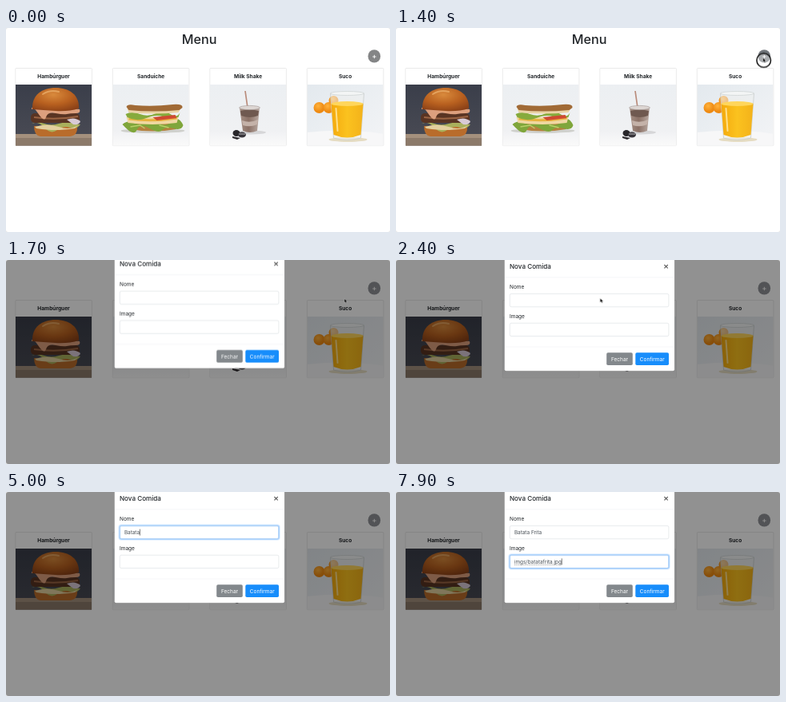
An HTML page that plays this animation: 480x256 px, repeating every 8 s.

```html
<!DOCTYPE html>
<html lang="pt">
<head>
<meta charset="utf-8">
<title>Menu</title>
<style>
  html, body { margin: 0; width: 100%; height: 100%; overflow: hidden; background: #e6e6e6; }
  svg { display: block; width: 100vw; height: 100vh; }
  text { font-family: Inter, Roboto, sans-serif; font-size: 6.5px; fill: #212529; white-space: pre; }
  .title { font-size: 16.2px; font-weight: 500; }
  .name { font-size: 6.6px; font-weight: 700; }
  .mid { text-anchor: middle; }
  .head { font-size: 8.1px; font-weight: 500; }
  .white { fill: #fff; }
  .value { font-size: 6.4px; fill: #495057; }
  .box { fill: #fff; stroke: #d9dde1; stroke-width: .6; }
  .focus { fill: none; stroke: #80bdff; stroke-width: .8; }
  .glow { fill: none; stroke: #007bff; stroke-opacity: .25; stroke-width: 1.4; }
</style>
</head>
<body>
<svg viewBox="0 0 480 256" preserveAspectRatio="none">
  <defs>
    <clipPath id="photo"><rect width="95" height="76.5"/></clipPath>
    <linearGradient id="night" x2="0" y2="1"><stop stop-color="#3a3e4a"/><stop offset="1" stop-color="#4b4c55"/></linearGradient>
    <linearGradient id="pale" x2="0" y2="1"><stop stop-color="#eceff2"/><stop offset=".75" stop-color="#f0f1f3"/><stop offset="1" stop-color="#fafafa"/></linearGradient>
    <linearGradient id="cool" x2="1" y2="1"><stop stop-color="#e3e9ee"/><stop offset="1" stop-color="#f3f4f6"/></linearGradient>
    <radialGradient id="bun" cx=".45" cy=".3" r=".75"><stop stop-color="#d98a3c"/><stop offset=".55" stop-color="#b8601f"/><stop offset="1" stop-color="#8b4117"/></radialGradient>
    <linearGradient id="shake" x2="1"><stop stop-color="#a58f85"/><stop offset=".45" stop-color="#8b7166"/><stop offset="1" stop-color="#b9aaa3"/></linearGradient>
    <linearGradient id="juice" x2="1"><stop stop-color="#f4a90d"/><stop offset=".5" stop-color="#fbc21f"/><stop offset="1" stop-color="#f3b21a"/></linearGradient>
    <radialGradient id="orange" cx=".4" cy=".35"><stop stop-color="#ffb33d"/><stop offset="1" stop-color="#ee8a12"/></radialGradient>

    <g id="burger">
      <rect width="95" height="77" fill="url(#night)"/>
      <rect y="62" width="95" height="15" fill="#a4907d"/>
      <rect y="67" width="95" height="10" fill="#8c7a6a"/>
      <path d="M23 52H77Q78 64 68 65H31Q23 64 23 52Z" fill="#b96c2b"/>
      <path d="M20 49Q28 46 36 49T54 49T70 48T81 50Q76 57 68 54T52 57T36 54T20 49Z" fill="#a9b05c"/>
      <path d="M24 53Q40 48 54 53T78 51L74 55Q60 57 50 57T26 55Z" fill="#e2cf9f"/>
      <rect x="19" y="36" width="61" height="12" rx="5" fill="#593423"/>
      <path d="M23 41Q50 45 78 40" fill="none" stroke="#9b6443" stroke-width="2"/>
      <path d="M64 44Q74 40 81 46Q80 51 72 50Z" fill="#d8cbd6"/>
      <path d="M20 31Q50 26 80 31Q82 36 75 36T64 37T50 36T38 41T28 36T20 31Z" fill="#dda07e"/>
      <path d="M21 31C20 13 33 4 50 4S80 13 79 30Q66 34 50 33T21 31Z" fill="url(#bun)"/>
      <path d="M34 12Q43 6 54 9" fill="none" stroke="#eeb46f" stroke-width="2" stroke-linecap="round" opacity=".7"/>
    </g>

    <g id="sandwich">
      <rect width="95" height="77" fill="url(#pale)"/>
      <ellipse cx="50" cy="58" rx="40" ry="3" fill="#cfd0cc"/>
      <path d="M18 49H82L79 56Q50 61 22 56Z" fill="#b5813f"/>
      <path d="M12 50Q18 44 26 48T42 47T58 48T74 46T88 51Q86 58 76 55T62 57T46 55T30 57T12 50Z" fill="#7fa63b"/>
      <path d="M17 41H82L80 48Q50 52 19 48Z" fill="#f0d8a2"/>
      <path d="M20 43Q50 47 80 42" fill="none" stroke="#e8b340" stroke-width="3"/>
      <path d="M16 37Q24 33 34 37T54 36T72 37T84 35L82 41Q70 43 62 40T42 42T18 41Z" fill="#86ab3c"/>
      <path d="M50 41L78 38L80 42L55 45Z" fill="#cf4a31"/>
      <path d="M18 30H85L82 35Q50 38 20 35Z" fill="#ead3a5"/>
      <path d="M17 28Q18 24 28 26Q50 28 75 25Q88 24 87 29L83 32Q50 35 20 32Z" fill="#a16a36"/>
      <path d="M22 53L34 51L40 55M58 51L70 54" fill="none" stroke="#b8cf68" stroke-width="1.5"/>
    </g>

    <g id="milkshake">
      <rect width="95" height="77" fill="url(#pale)"/>
      <ellipse cx="51" cy="60" rx="19" ry="2.5" fill="#d6d6d8"/>
      <path d="M44 8L47 29" stroke="#b98b7b" stroke-width="1.7"/>
      <path d="M37 29H62L59 58Q50 62 41 58Z" fill="url(#shake)"/>
      <path d="M38 33Q50 30 61 33L60 39Q50 43 39 39Z" fill="#6f5950"/>
      <path d="M40 45Q50 49 60 44L59 50Q50 54 41 51Z" fill="#c4b2a9"/>
      <ellipse cx="49.5" cy="29" rx="13" ry="2.6" fill="#ddd6d3" stroke="#aaa09c" stroke-width=".7"/>
      <ellipse cx="33" cy="61" rx="4.5" ry="4" fill="#28262a"/>
      <ellipse cx="40" cy="63" rx="5" ry="3.5" fill="#37343a"/>
      <path d="M28 65L38 67L34 69L28 67Z" fill="#2e2b2f"/>
      <path d="M36 62H44" stroke="#ddd" stroke-width=".8"/>
    </g>

    <g id="suco">
      <rect width="95" height="77" fill="url(#cool)"/>
      <path d="M0 60Q50 54 95 62V77H0Z" fill="#f7f7f8"/>
      <ellipse cx="51" cy="69" rx="24" ry="3" fill="#e5dcc2"/>
      <circle cx="33" cy="20" r="6" fill="url(#orange)"/>
      <circle cx="15" cy="29" r="7" fill="url(#orange)"/>
      <circle cx="27" cy="29" r="7" fill="url(#orange)"/>
      <path d="M29 11H71L67 67Q50 72 33 67Z" fill="#eef0ee" fill-opacity=".55" stroke="#c9cdcc" stroke-width=".8"/>
      <path d="M30 24Q50 20 70 24L67 63Q50 70 33 63Z" fill="url(#juice)"/>
      <ellipse cx="50" cy="24" rx="20" ry="3" fill="#ffd65c"/>
      <path d="M36 30L38 58" stroke="#ffe08a" stroke-width="2" stroke-linecap="round"/>
      <ellipse cx="50" cy="11" rx="21" ry="2.5" fill="#f3f5f5" stroke="#ccd1d2" stroke-width=".7"/>
    </g>
  </defs>

  <rect width="480" height="256" rx="3" fill="#fff"/>
  <text class="title mid" x="241.7" y="20">Menu</text>
  <g id="cards"></g>
  <g id="add">
    <ellipse id="addDisc" cx="460.3" cy="35.4" rx="7.8" ry="8.2" fill="#848586"/>
    <path d="M458.2 36H462.6M460.4 33.8V38.2" stroke="#fff" stroke-width=".9"/>
  </g>
  <rect id="backdrop" width="480" height="256" rx="3" opacity="0"/>

  <g id="modal" opacity="0">
    <rect x="135.6" y="-12" width="212.6" height="151.2" rx="2" fill="#fff" stroke="#000" stroke-opacity=".2" stroke-width=".5"/>
    <path d="M136 21.8H348M136 109H348" stroke="#eceef0" stroke-width=".5"/>
    <text class="head" x="142" y="11.2">Nova Comida</text>
    <path d="M335.4 6L339.8 10.4M339.8 6L335.4 10.4" stroke="#666" stroke-width="1.2"/>
    <g id="fields"></g>
    <rect x="263.2" y="116.3" width="32.6" height="15.8" rx="1.8" fill="#83888c"/>
    <text class="white mid" x="279.5" y="126.6">Fechar</text>
    <rect x="299.3" y="116.3" width="41.7" height="15.8" rx="1.8" fill="#178dfb"/>
    <text class="white mid" x="320.2" y="126.6">Confirmar</text>
  </g>

  <g id="pointer" opacity="0">
    <circle id="ring" r="8.8" cx="-.3" cy="1" fill="#fff" fill-opacity=".4" stroke="#111" stroke-width="1.5" opacity="0"/>
    <path d="M-1.2 -2V3.2L0 2.1L.9 4L1.9 3.5L1 1.7H2.6Z" fill="#000" stroke="#fff" stroke-width=".35"/>
  </g>
</svg>
<script>
const LOOP = 8000;
const $ = id => document.getElementById(id);

$('cards').innerHTML = [['Hambúrguer', 'burger'], ['Sanduíche', 'sandwich'], ['Milk Shake', 'milkshake'], ['Suco', 'suco']]
  .map(([name, art], i) => `<g transform="translate(${12 + i * 121.5} 50.5)">
    <rect x="-.2" width="95.6" height="97.2" rx="1" fill="#fff" stroke="#dcdcdc" stroke-width=".6"/>
    <text class="name mid" x="47.6" y="12.8">${name}</text>
    <g transform="translate(0 20.5)" clip-path="url(#photo)"><use href="#${art}"/></g></g>`).join('');

$('fields').innerHTML = [['Nome', 'nome'], ['Image', 'image']]
  .map(([label, id], i) => `<g transform="translate(142.3 ${42.4 + i * 36.8})">
    <text x="-.3" y="-6">${label}</text>
    <rect class="box" width="198.6" height="16.4" rx="1.8"/>
    <g id="${id}Focus" opacity="0"><rect class="glow" x="-.8" y="-.8" width="200.2" height="18" rx="2.4"/>
    <rect class="focus" width="198.6" height="16.4" rx="1.8"/></g>
    <text class="value" id="${id}Text" x="5.6" y="10.5"></text>
    <path id="${id}Line" stroke="#777" stroke-width=".7" stroke-dasharray="1 .8" d=""/>
    <path id="${id}Caret" stroke="#222" stroke-width=".6" d="M0 4.2V12.2"/></g>`).join('');

// Each row is [ms, properties, easing to the next row].
function track(id, rows) {
  const frames = rows.map(([ms, props, easing = 'linear']) => ({ offset: ms / LOOP, easing, ...props }));
  frames.push({ ...frames[frames.length - 1], offset: 1 });
  return $(id).animate(frames, { duration: LOOP, iterations: Infinity });
}
const fade = (id, ...rows) => track(id, rows.map(([ms, opacity, easing]) => [ms, { opacity }, easing]));
const at = (ms, x, y, easing) => [ms, { transform: `translate(${x}px, ${y}px)` }, easing];

const clock = fade('backdrop', [0, 0], [1420, 0], [1500, .41], [1580, .43]);
fade('modal', [0, 0], [1450, 0], [1500, .31], [1600, .8], [1660, 1]);
track('modal', [at(0, 0, -25), at(1420, 0, -25), at(1500, 0, -18), at(1600, 0, -9), at(1700, 0, -3.4), at(1800, 0, 0)]);
fade('pointer', [0, 0, 'step-end'], [90, 1, 'step-end'], [3490, 0, 'step-end']);
fade('ring', [0, 0, 'step-end'], [1290, 1, 'step-end'], [1470, 0, 'step-end'], [2490, 1, 'step-end'], [2650, 0, 'step-end']);
track('pointer', [at(0, 340, 254), at(100, 340, 252, 'ease-in-out'), at(1000, 459, 41), at(1400, 460, 39.5),
  at(1500, 460, 41, 'ease-in'), at(1700, 424.5, 50.5, 'ease-out'), at(2500, 252, 50), at(2700, 252, 50)]);
track('addDisc', [[0, { fill: '#848586' }], [900, { fill: '#848586' }], [1000, { fill: '#70757a' }],
  [1550, { fill: '#70757a' }], [1700, { fill: '#909397' }]]);
fade('nomeFocus', [0, 0], [2490, 0], [2640, 1], [6340, 1], [6490, 0]);
fade('imageFocus', [0, 0], [6390, 0], [6540, 1]);

// Text lengths shown from each time on; the first row is the moment of focus.
const inputs = [
  { id: 'nome', text: 'Batata Frita', blur: 6390, keys: [[2500, 0], [3500, 1], [3700, 2], [3900, 3], [4100, 4], [4400, 5],
    [4700, 6], [5000, 7], [5200, 8], [5400, 9], [5600, 10], [5700, 11], [5800, 12]] },
  { id: 'image', text: 'imgs/batatafrita.jpg', blur: LOOP + 100, checked: 7700,
    keys: [[6400, 0], [6500, 1], [6600, 2], [6700, 3], [6900, 5], [7000, 7], [7400, 20]] }
];

function draw() {
  const t = (clock.currentTime || 0) % LOOP + 10;
  for (const { id, text, keys, blur, checked } of inputs) {
    const [since, count] = keys.filter(([ms]) => ms <= t).pop() || [LOOP * 2, 0];
    const field = $(id + 'Text');
    const shown = text.slice(0, count);
    if (field.textContent !== shown) field.textContent = shown;
    const end = 5.9 + (count ? field.getComputedTextLength() : 0);
    const blinkOn = t >= since && t < blur && (t - since) % 1000 < 500;
    $(id + 'Caret').setAttribute('transform', `translate(${end} 0)`);
    $(id + 'Caret').setAttribute('opacity', blinkOn ? 1 : 0);
    $(id + 'Line').setAttribute('d', checked && t >= checked ? `M5.6 12.2H${end}` : '');
  }
  requestAnimationFrame(draw);
}
draw();
</script>
</body>
</html>
```
